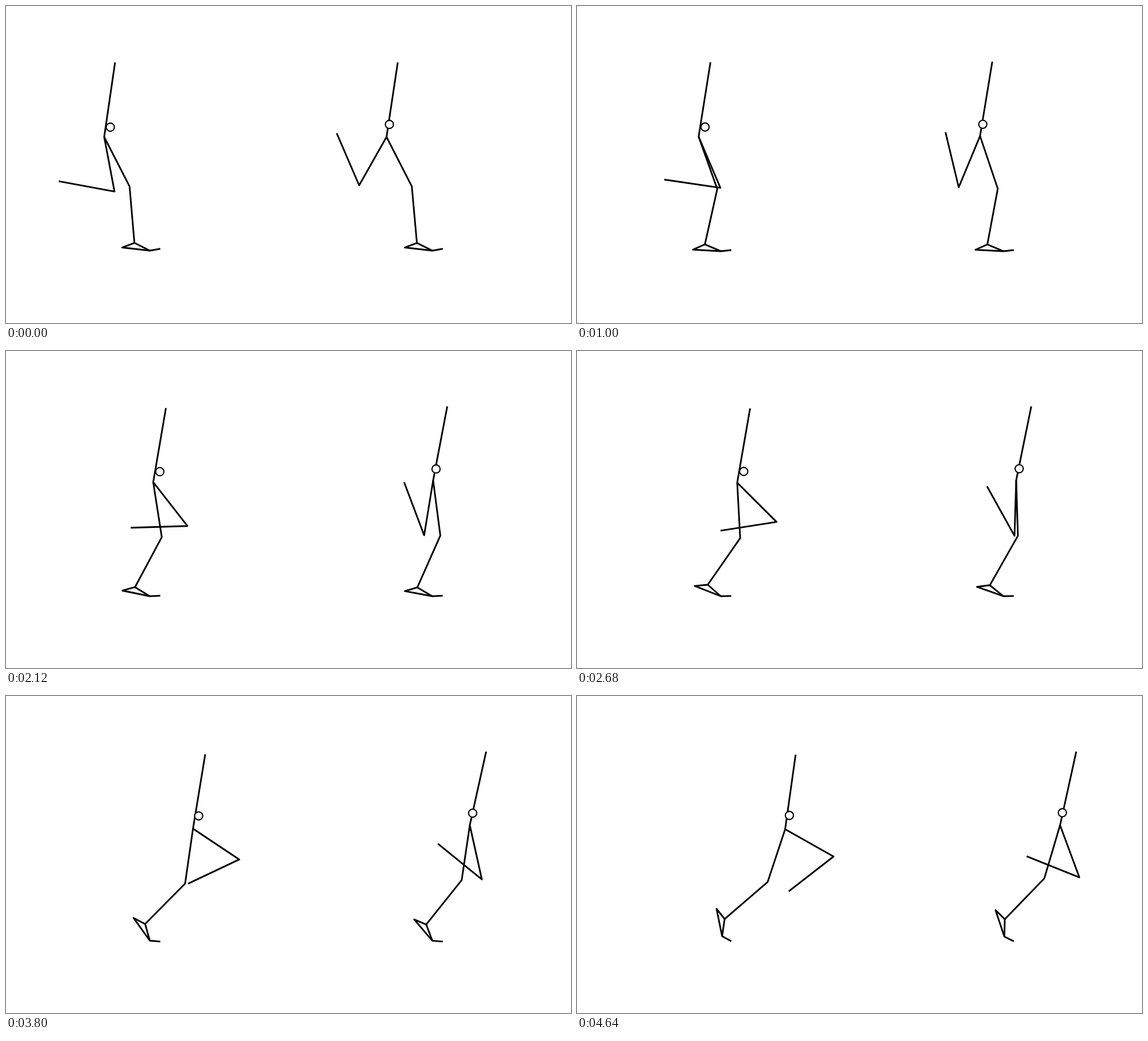
Write an HTML page with a canvas that moves like this. It is 984x552 px and loops after 4.66 s.

```html
<!DOCTYPE html>
<html lang="en">
<head>
<meta charset="utf-8">
<title>Two walkers</title>
<style>
  html, body { margin: 0; width: 100%; height: 100%; overflow: hidden; background: #fff; }
  canvas { display: block; }
</style>
</head>
<body>
<canvas id="stage" width="984" height="552"></canvas>
<script>
const ctx = document.getElementById('stage').getContext('2d');
const LOOP = 4660, LAST = 100;
const LEN = { torso: 131.2, thigh: 96.8, shank: 98.8, foot: 48.7, toe: 18.3 };

// Cubic through four values spaced evenly over u = 0..1.
const cubic = (a, b, c, d) => u => {
  const s = 3 * u;
  return -a * (s - 1) * (s - 2) * (s - 3) / 6 + b * s * (s - 2) * (s - 3) / 2
    - c * s * (s - 1) * (s - 3) / 2 + d * s * (s - 1) * (s - 2) / 6;
};

// Angles are degrees from the vertical; lift is how far the heel turns up.
const walkers = [
  {
    x: 0, lift: 101,
    hipX: cubic(171, 232.8, 295.6, 362.5),
    hipY: cubic(228, 227.8, 229.9, 232),
    torso: cubic(8.3, 9.4, 9.8, 8),
    swingThigh: cubic(10.7, 30.1, 49.7, 60.6),
    swingShank: cubic(-100.5, -94.4, -75.4, -52.2),
    comX: cubic(181.7, 244.2, 306.6, 369.9),
    comY: cubic(211, 210.5, 209.4, 208)
  },
  {
    x: 492, lift: 92,
    hipX: cubic(170.7, 229.8, 288.2, 349.3),
    hipY: cubic(228, 225.8, 225, 225),
    torso: cubic(8.6, 10, 12, 12.4),
    swingThigh: cubic(-29.5, -16.8, 3.7, 20.3),
    swingShank: cubic(-156.7, -165, -143.6, -111.8),
    comX: cubic(175.7, 234.7, 293.4, 353.3),
    comY: cubic(206.2, 205.8, 204.7, 203.2)
  }
];

const rad = deg => deg * Math.PI / 180;
const up = ([x, y], len, deg) => [x + len * Math.sin(rad(deg)), y - len * Math.cos(rad(deg))];
const down = (p, len, deg) => up(p, -len, -deg);

// Toes stay planted: the sole lands, the heel rolls up, then the ball pushes off.
function footPose(lift, u) {
  const landing = Math.exp(-u / 0.07), push = u ** 11;
  const tip = [268.7, 424 + 4.6 * u - 1.3 * landing - 1.5 * push];
  const ballY = 427 - landing - 0.087 * lift * push;
  const ball = [tip[0] - Math.sqrt(LEN.toe ** 2 - (tip[1] - ballY) ** 2), ballY];
  const tilt = rad(5.7 * landing + lift / (1 + Math.exp(-6.1 * (u - 0.795))));
  const cos = Math.cos(tilt), sin = Math.sin(tilt);
  const place = (along, above) =>
    [ball[0] - along * cos + above * sin, ball[1] - along * sin - above * cos];
  return { tip, ball, heel: place(LEN.foot, 0), ankle: place(28.4, 10.3) };
}

// Knee of a two-bone leg, bending forward.
function kneeBetween(hip, ankle) {
  const dx = ankle[0] - hip[0], dy = ankle[1] - hip[1], d = Math.hypot(dx, dy);
  const along = (d * d + LEN.thigh ** 2 - LEN.shank ** 2) / (2 * d);
  const out = Math.sqrt(Math.max(0, LEN.thigh ** 2 - along ** 2));
  return [hip[0] + (dx * along + dy * out) / d, hip[1] + (dy * along - dx * out) / d];
}

function line(...points) {
  ctx.beginPath();
  points.forEach(p => ctx.lineTo(...p));
  ctx.stroke();
}

function drawWalker(w, u) {
  const hip = [w.hipX(u), w.hipY(u)];
  const { tip, ball, heel, ankle } = footPose(w.lift, u);
  const knee = kneeBetween(hip, ankle);
  const head = up(hip, LEN.torso, w.torso(u));
  const swingKnee = down(hip, LEN.thigh, w.swingThigh(u));
  const swingEnd = down(swingKnee, LEN.shank, w.swingShank(u));

  ctx.save();
  ctx.translate(w.x, 0);
  ctx.lineWidth = 2.9;
  line(head, hip, knee, ankle, heel, ball, tip);
  line(ankle, ball);
  line(hip, swingKnee, swingEnd);

  ctx.lineWidth = 2.1;
  ctx.beginPath();
  ctx.arc(w.comX(u), w.comY(u), 7.1, 0, 2 * Math.PI);
  ctx.fill();
  ctx.stroke();
  ctx.restore();
}

// Poses come in threes, held 100, 20 and 20 ms, after a 20 ms opening pose.
function stepAt(ms) {
  if (ms < 20) return 0;
  const t = ms - 20, r = t % 140;
  return 1 + 3 * Math.floor(t / 140) + (r < 100 ? 0 : r < 120 ? 1 : 2);
}

const start = performance.now();
function render() {
  const u = stepAt((performance.now() - start) % LOOP) / LAST;
  ctx.fillStyle = '#fff';
  ctx.strokeStyle = '#000';
  ctx.lineJoin = 'round';
  ctx.fillRect(0, 0, 984, 552);
  walkers.forEach(w => drawWalker(w, u));
  requestAnimationFrame(render);
}
render();
</script>
</body>
</html>
```
